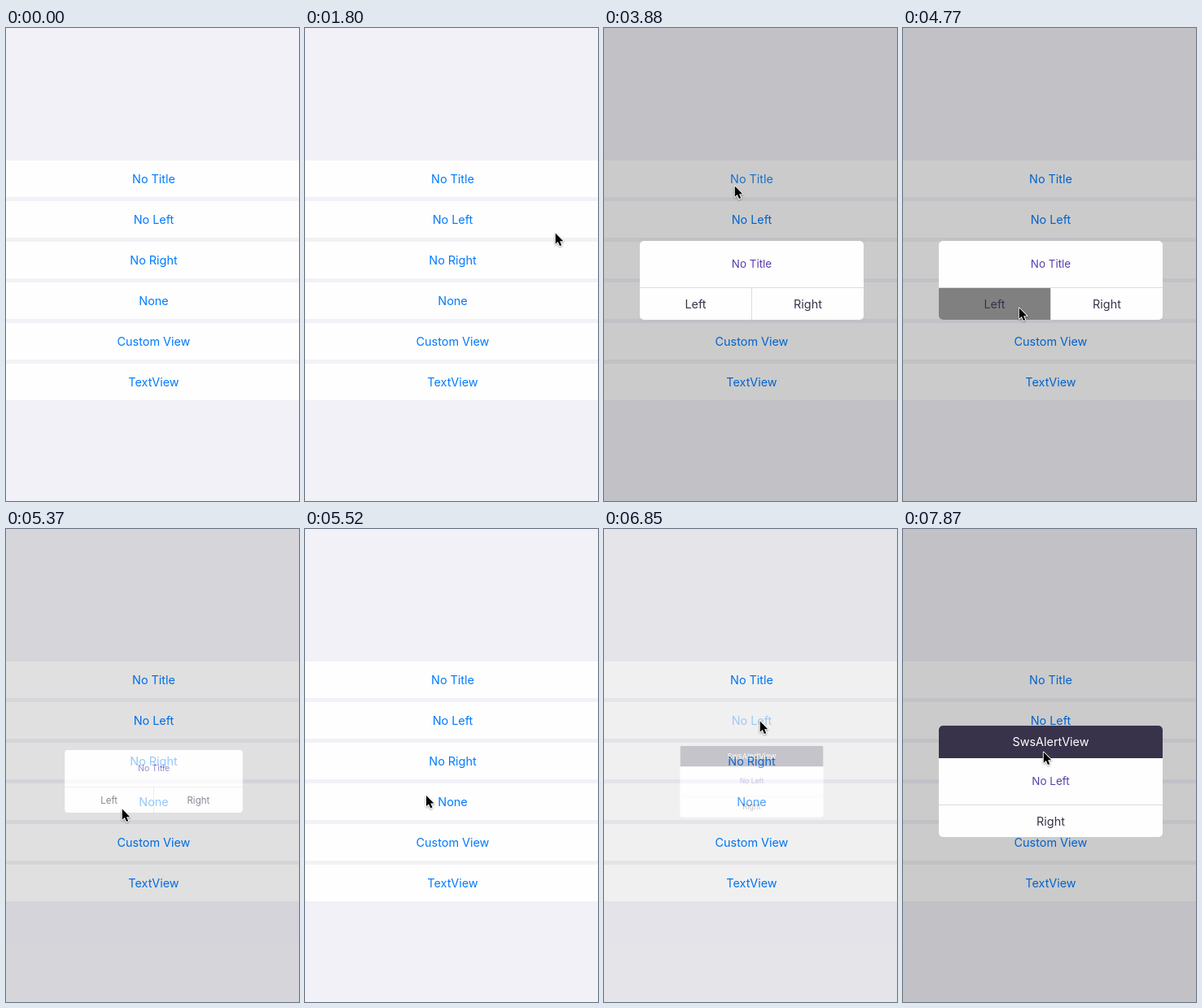
Recreate the animation shown at these times as an HTML page. Size 360x582 px, loop 8 s.

```html
<!DOCTYPE html>
<html lang="en">
<head>
<meta charset="utf-8">
<title>Alert views</title>
<style>
  html, body { margin: 0; width: 100%; height: 100%; overflow: hidden; background: #f2f1f7; }
  #stage { position: relative; width: 360px; height: 582px; overflow: hidden;
    font: 14.4px Inter, Roboto, sans-serif; text-align: center; }
  .row { position: absolute; left: 0; width: 363px; height: 45px; line-height: 45px;
    background: #fefefe; color: #007aff; }
  #overlay { position: absolute; inset: 0; background: rgba(0, 0, 0, .2); }
  .alert { position: absolute; left: 44px; width: 275px; border-radius: 5px; overflow: hidden;
    background: #fefefe; color: #38334a; }
  .head { height: 40px; line-height: 40px; background: #38334a; color: #fff; }
  .msg { height: 57px; line-height: 57px; font-size: 13.44px; color: #5a3fac; }
  .bar { display: flex; height: 39px; line-height: 39px; border-top: 1px solid #dcdcdc; }
  .bar div { flex: 1; }
  .bar div + div { border-left: 1px solid #dcdcdc; }
  #one { top: 262px; }
  #two { top: 242px; }
  #cursor { position: absolute; left: -2.5px; top: -3px; overflow: visible;
    filter: drop-shadow(0 1px 1px rgba(0, 0, 0, .35)); }
</style>
</head>
<body>
<div id="stage">
  <div id="rows"></div>
  <div id="overlay">
    <div class="alert" id="one">
      <div class="msg">No Title</div>
      <div class="bar"><div id="left">Left</div><div>Right</div></div>
    </div>
    <div class="alert" id="two">
      <div class="head">SwsAlertView</div>
      <div class="msg">No Left</div>
      <div class="bar"><div>Right</div></div>
    </div>
  </div>
  <svg id="cursor" width="17" height="23" viewBox="-2 -2 16 22">
    <path d="M0.5 0.5V13L3.4 10.4L5.5 15.3L7.7 14.4L5.6 9.6H9.6Z"
      fill="#000" stroke="#fff" stroke-width="1.8" stroke-linejoin="round" paint-order="stroke"/>
  </svg>
</div>
<script>
const LOOP = 8000;
// The picture only changes on ticks, counted from the first sight of the cursor.
const FIRST = 1046, TICK = 148.3;
const $ = id => document.getElementById(id);

const labels = ['No Title', 'No Left', 'No Right', 'None', 'Custom View', 'TextView'].map((text, i) => {
  const row = document.createElement('div');
  const label = document.createElement('span');
  row.className = 'row';
  row.style.top = 163 + 50 * i + 'px';
  label.textContent = text;
  row.append(label);
  $('rows').append(row);
  return label;
});

const moves = [
  { from: 0, to: 5, x: 307, y: 253 },
  { from: 5, to: 8, x: 222, y: 90 },
  { from: 8, to: 10, x: 175, y: 108 },
  { from: 11, to: 15, x: 160, y: 195 },
  { from: 19, to: 24, x: 142, y: 345 },
  { from: 29, to: 33, x: 182, y: 239 },
  { from: 34, to: 35, x: 191, y: 237 },
  { from: 40, to: 46, x: 172, y: 275 }
];

function ease(u) {
  u = Math.min(Math.max(u, 0), 1);
  return u * u * (3 - 2 * u);
}

function cursorAt(k) {
  let x = 320, y = 350;
  for (const m of moves) {
    const e = ease((k - m.from) / (m.to - m.from));
    x += (m.x - x) * e;
    y += (m.y - y) * e;
  }
  return `translate(${x}px, ${y}px)`;
}

// A tapped label drops to 20 % and fades back over two ticks.
const tapped = (k, down, up) => k < down ? 1 : .2 + .8 * ease((k - up) / 2);

function draw(t) {
  const k = Math.floor((t - FIRST) / TICK);
  $('cursor').style.visibility = k === 0 || k >= 5 ? 'visible' : 'hidden';
  $('cursor').style.transform = cursorAt(k);

  const shown = ease(k - 17.77) - ease(k - 28.56) + ease(k - 38.65);
  const second = k > 30;
  $('overlay').style.opacity = shown;
  $('one').hidden = second;
  $('two').hidden = !second;
  $('one').style.scale = $('two').style.scale = .5 + shown / 2;

  labels[0].style.opacity = tapped(k, 16, 17.5);
  labels[1].style.opacity = tapped(k, 37, 38.5);
  $('left').style.background = k >= 25 && k < 29 ? '#808080' : 'none';
}

const start = performance.now();
function tick() {
  draw((performance.now() - start) % LOOP);
  requestAnimationFrame(tick);
}
tick();
</script>
</body>
</html>
```
